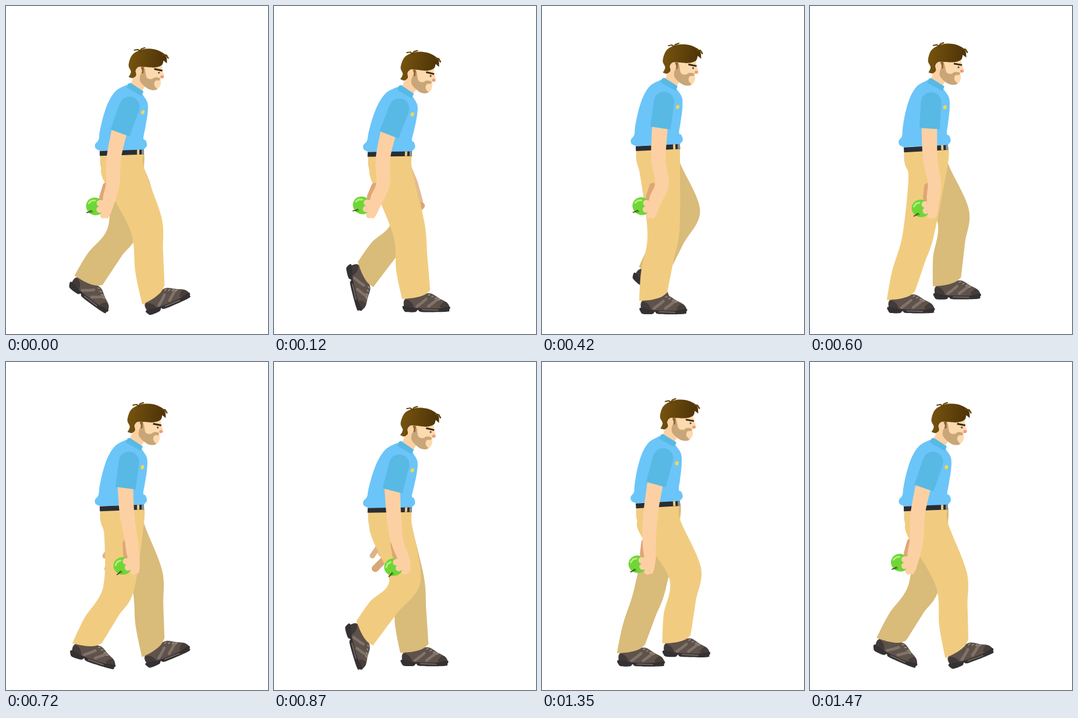
These frames come from a looping animation (450x563 px, 1.5 s). An HTML page with a canvas:

```html
<!DOCTYPE html>
<html lang="en">
<head>
<meta charset="utf-8">
<title>Walking man</title>
<style>
  html, body { margin: 0; width: 100%; height: 100%; overflow: hidden; background: #fff; }
  canvas { display: block; }
</style>
</head>
<body>
<canvas id="stage" width="450" height="563"></canvas>
<script>
const ctx = document.getElementById('stage').getContext('2d');
const LOOP = 1500, STEP = LOOP / 2, FRAME = 30;
const SKIN = '#fdd0a3', SHIRT = '#6bc5f8', SLEEVE = '#58b9e4', HAIR = '#62430c';

// --- Motion helpers ---

// Cosine that is highest at the time `peak`
const swing = (time, period, peak, mean, size) => mean + size * Math.cos((time - peak) / period * 2 * Math.PI);

// Sum of harmonics of one loop, each given as [cosine, sine]
const harmonics = (time, mean, ...parts) => parts.reduce((sum, [c, s], i) => {
  const angle = (i + 1) * time / LOOP * 2 * Math.PI;
  return sum + c * Math.cos(angle) + s * Math.sin(angle);
}, mean);

function ramp(time, from, to) {
  const u = Math.min(1, Math.max(0, (time - from) / (to - from)));
  return u * u * (3 - 2 * u);
}

// One leg's stride; phase 0 is its heel strike
function stride(time) {
  const t = time % LOOP;
  const lift = 76 * ramp(t, 640, 900) * (1 - ramp(t, 1020, 1370));
  const strike = 24 * (ramp(t, 1350, 1500) + 1 - ramp(t, 0, 130));
  return {
    foot: [
      harmonics(t, 204, [58, 16.5], [7.6, -4.6], [5.3, -1.8]),
      harmonics(t, 499, [1.8, 17], [1.2, -2], [0, 2])
    ],
    turn: lift - strike,
    knee: [
      harmonics(t, 224.5, [19, -19], [-5, 7.5], [2, -4.2]),
      harmonics(t, 377, [-6.4, 15], [4, .5], [0, 1.7])
    ]
  };
}

// --- Drawing helpers ---

const pairs = flat => flat.flatMap((v, i) => i % 2 ? [] : [[v, flat[i + 1]]]);
const toward = (a, b, k) => [a[0] + (b[0] - a[0]) * k, a[1] + (b[1] - a[1]) * k];

// Closed smooth shape through the points; a doubled point makes a corner
function blob(points, fill) {
  const n = points.length, p = i => points[(i + n) % n];
  ctx.beginPath();
  ctx.moveTo(...points[0]);
  for (let i = 0; i < n; i++) {
    const [a, b, c, d] = [p(i - 1), p(i), p(i + 1), p(i + 2)];
    if (b[0] === c[0] && b[1] === c[1]) continue;
    ctx.bezierCurveTo(b[0] + (c[0] - a[0]) / 6, b[1] + (c[1] - a[1]) / 6,
      c[0] - (d[0] - b[0]) / 6, c[1] - (d[1] - b[1]) / 6, c[0], c[1]);
  }
  ctx.fillStyle = fill;
  ctx.fill();
}
const shape = (fill, ...flat) => blob(pairs(flat), fill);

function line(color, width, cap, ...flat) {
  ctx.beginPath();
  pairs(flat).forEach(p => ctx.lineTo(...p));
  ctx.strokeStyle = color;
  ctx.lineWidth = width;
  ctx.lineCap = cap;
  ctx.lineJoin = 'round';
  ctx.stroke();
}

function oval(fill, x, y, rx, ry = rx, turn = 0) {
  ctx.beginPath();
  ctx.ellipse(x, y, rx, ry, turn, 0, 7);
  ctx.fillStyle = fill;
  ctx.fill();
}

function placed(x, y, degrees, draw) {
  ctx.save();
  ctx.translate(x, y);
  ctx.rotate(degrees * Math.PI / 180);
  draw();
  ctx.restore();
}

function mapper(x, y, degrees) {
  const c = Math.cos(degrees * Math.PI / 180), s = Math.sin(degrees * Math.PI / 180);
  return (px, py) => [x + px * c - py * s, y + px * s + py * c];
}

// --- Body parts ---

function shoe() {
  ctx.scale(.94, .96);
  shape('#5f524b', -40, 6, -38, -8, -10, -15, 8, -17, 24, -8, 37, -1, 42, 8, 36, 12, -30, 12);
  shape('#403a38', -40, 6, -38, -6, -28, -2, -23, 9);
  shape('#453e3b', 25, 8, 31, -1, 38, 0, 42, 9);
  for (let x = -17; x < 8; x += 21) line('#80736a', 5, 'round', x, 6, x + 11, -2, x + 17, -7);
  for (let i = 0; i < 4; i++) line('#a99a89', 1.5, 'round', 4 + 6 * i, -14 + 3 * i, 7 + 6 * i, -15 + 3 * i);
  shape('#343132', -42, 5, -41, 13, -36, 16, -20, 16, -15, 12, -8, 16, 37, 16, 42, 12, 42, 7, 20, 10, -18, 9);
  line('#716861', 2, 'butt', -8, 12, 22, 13);
}

function leg({ foot: [fx, fy], turn, knee }, hip, seat, color) {
  placed(fx, fy, turn, shoe);
  const at = mapper(fx, fy, turn);
  const front = at(7, -22), back = at(-41.5, -7), ankle = at(-17, -13), joint = hip(198, 275);
  // The knee's width lies across the line from hip to ankle
  const dx = ankle[0] - joint[0], dy = ankle[1] - joint[1], k = 27.5 / Math.hypot(dx, dy);
  const across = s => [knee[0] + s * dy * k, knee[1] - s * (dx * k + 5)];
  const kneeFront = across(1), kneeBack = across(-1);
  const waistBack = hip(162, 250), waistFront = hip(237, 250);
  const calf = toward(toward(kneeBack, back, .55), toward(kneeFront, front, .55), -.06);
  blob([
    waistBack, waistBack, waistFront, waistFront, hip(237, 278),
    kneeFront, toward(kneeFront, front, .5), front, front,
    at(-3, -14), at(-20, -9), back, back,
    calf, kneeBack, hip(seat, 301), hip(163, 275)
  ], color);
}

function farArm(x) {
  const y = 337 - (246 - x) * .2;
  line('#e6bb95', 22, 'round', 210, 200, 214 + (x - 216) * .15, 262, x - (x - 216) * .3, 305, x, y);
  line('#dcb48a', 9, 'round', x - 9, y - 9, x - 20, y + 7);
  line('#dba676', 12, 'round', x + 8, y + 6, x - 15, y + 29);
}

function torso() {
  shape(SHIRT, 208, 134, 208, 134, 189, 144, 176, 163, 167, 188, 161, 214, 159, 228, 153, 236, 154, 243,
    161, 247, 161, 247, 236, 247, 236, 247, 242, 240, 240, 231, 236, 227, 239, 210, 243, 185, 243, 166, 235, 152, 235, 152);
  line('#292e34', 8.5, 'butt', 161, 251.7, 237, 250.7);
  line('#eec983', 8.5, 'butt', 225, 250.7, 229, 250.7);
  line('#8c8f94', 8.5, 'butt', 233, 250.7, 237, 250.7);
  oval('#f6d552', 235, 182, 3, 3.6, .3);
}

function collar() {
  ctx.beginPath();
  pairs([210, 132, 214, 131, 236, 146, 233, 154, 207, 139]).forEach(p => ctx.lineTo(...p));
  ctx.fillStyle = SLEEVE;
  ctx.fill();
}

function head() {
  shape('#fbd1a4', 223, 118, 215, 132, 215, 132, 234, 145, 234, 145, 242, 132, 242, 120);
  shape('#fdd9ae', 232, 98, 264, 98, 269, 110, 272, 121, 266, 124, 266, 134, 259, 143, 246, 140, 234, 128);
  shape('#c8a678', 235, 106, 230, 124, 234, 133, 245, 142, 255, 144, 260, 142, 260, 142,
    255, 135, 257, 128, 264, 127, 264, 123, 256, 122, 250, 125, 242, 122, 239, 108);
  line('#8b6837', 5, 'butt', 235, 104, 234, 115);
  oval('#fbd3a6', 228, 111, 6, 7);
  oval('#f3987c', 268.5, 121, 3, 2.6);
  line('#3c2a10', 3, 'butt', 255, 107.5, 269, 110.5);
  oval('#4c5538', 263, 114, 1.6);
  const shade = ctx.createLinearGradient(215, 90, 270, 98);
  shade.addColorStop(0, '#74520f');
  shade.addColorStop(1, '#503508');
  shape(shade, 211, 121, 211, 121, 215, 112, 211, 101, 216, 85, 226, 77, 240, 73, 256, 74, 270, 80, 276, 87, 277, 98, 277, 98,
    271, 93, 271, 93, 268, 101, 256, 105, 239, 104, 239, 104, 228, 104, 223, 110, 224, 118, 218, 123);
  line(HAIR, 2, 'round', 221, 75, 227, 74, 233, 78);
  line(HAIR, 2, 'round', 239, 71, 233, 73, 230, 78);
  line(HAIR, 2.5, 'round', 270, 83, 276, 84, 279, 89);
}

function apple() {
  oval('#6fd638', -17, -4, 16, 15, .5);
  line('#b4f07c', 3, 'round', -28, -10, -23, -14, -17, -14);
  oval('#4eb520', -25, 5, 4, 2);
  line('#5c4523', 1.8, 'round', -24, 3, -28, 5, -32, 6);
}

function nearArm(time, [sx, sy]) {
  const sway = (peak, mean, size) => swing(time, LOOP, peak, mean, size);
  const cuff = [sway(650, 200.5, 5), sy + 45];
  const elbow = sway(720, 196.5, 11.5), wrist = sway(690, 199, 16);
  const palm = [sway(855, 195, 27), 347, sway(970, -14, -18)];
  const hand = mapper(...palm);
  placed(...palm, () => {
    line('#e0a675', 11, 'round', 3, -38, -4, -19);
    apple();
    for (const tip of [[-9, -9], [-10, 2], [-4, 12]]) line(SKIN, 11, 'round', 7, -2, ...tip);
  });
  const [cx, cy] = cuff;
  blob([
    [cx - 14, cy - 8], [cx - 14, cy - 8], [cx + 13, cy - 4], [cx + 13, cy - 4],
    [elbow + 12.5, 262], [wrist + 11.5, 307], hand(15, -5), hand(4, 17), hand(-4, 10),
    hand(-3, -18), [wrist - 11.5, 303], [elbow - 12.5, 262]
  ], SKIN);
  line(SLEEVE, 35, 'butt', sx, sy, ...cuff);
  oval(SLEEVE, sx, sy, 17.4);
}

function draw(time) {
  const bob = (peak, mean, size) => swing(time, STEP, peak, mean, size);
  const rise = bob(110, -3, 6), tilt = bob(170, -1.7, 1.8);
  const hip = (x, y) => [x, y + rise + tilt * (x - 200) / 76];
  // Lean and stretch the trunk between waist and neck
  const leanX = bob(170, -.7, 6) / 117, leanY = (bob(130, -2, 6.8) - rise) / 117;
  const onTrunk = part => {
    ctx.save();
    ctx.transform(1, tilt / 76, -leanX, 1 - leanY, leanX * 247, rise + leanY * 247 - tilt * 200 / 76);
    part();
    ctx.restore();
  };
  const far = stride(time + STEP + 15);
  far.foot[1] -= 4;
  far.knee[1] -= 4;

  ctx.fillStyle = '#fff';
  ctx.fillRect(0, 0, 450, 563);
  farArm(swing(time, LOOP, 60, 217, 29));
  leg(far, hip, 176, '#d9bb7a');
  leg(stride(time), hip, 169, '#f1cc80');
  onTrunk(torso);
  placed(235 + bob(185, -.5, 7.3), 125 + bob(145, -2, 7.5), bob(200, 0, 2.2), () => {
    ctx.translate(-235, -125);
    head();
  });
  onTrunk(collar);
  nearArm(time, [212 + leanX * 75, 172 + rise + leanY * 75]);
}

const start = performance.now();
function tick() {
  const time = (performance.now() - start) % LOOP;
  draw(Math.floor(time / FRAME) * FRAME);
  requestAnimationFrame(tick);
}
tick();
</script>
</body>
</html>
```
